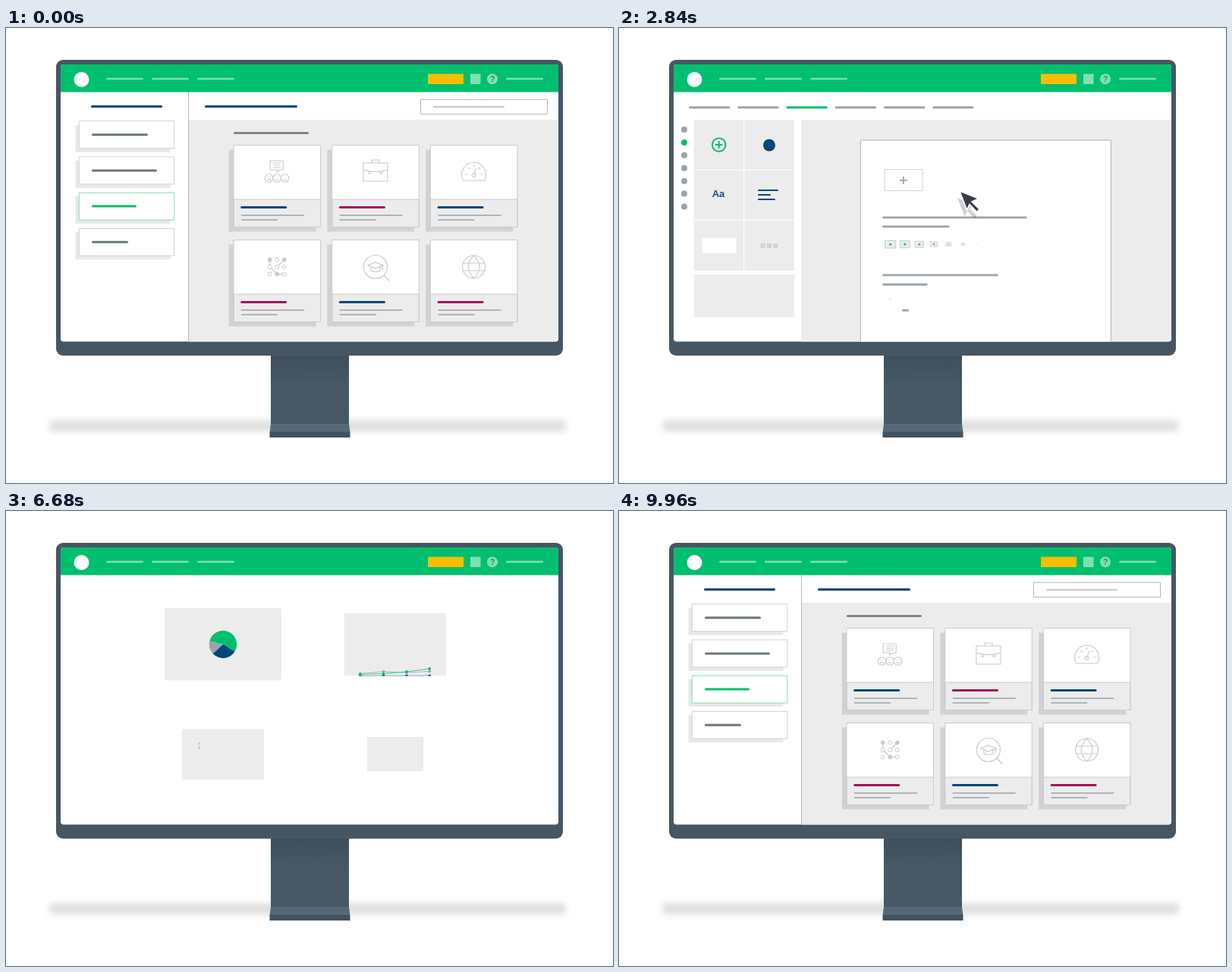
Animation of 800x600 px, one loop 10000 ms. Source, as an HTML page with a canvas:

```html
<!DOCTYPE html>
<html lang="en">
<head>
<meta charset="utf-8">
<title>Survey builder on a monitor</title>
<style>
  html, body { margin: 0; width: 100%; height: 100%; overflow: hidden; background: #fff; }
  canvas { display: block; }
</style>
</head>
<body>
<canvas id="stage" width="800" height="600"></canvas>
<script>
const ctx = document.getElementById('stage').getContext('2d');
const GREEN = '#00bf6f', NAVY = '#00467f', PLUM = '#a3135a', GREY = '#9ba4aa',
      SLATE = '#6b777d', PALE = '#ececec', MINT = '#80dfb3', ICON = '#c8cacc';
const TAU = Math.PI * 2;

// Timing
const part = (t, start, dur) => Math.min(1, Math.max(0, (t - start) / dur));
const easeOut = (t, start, dur = 1000) => {
  const p = part(t, start, dur);
  return p === 1 ? 1 : 1 - 2 ** (-10 * p);
};
const easeIn = (t, start, dur) => part(t, start, dur) ** 3;
const easeBoth = p => p < .5 ? 4 * p ** 3 : 1 - 4 * (1 - p) ** 3;

// Drawing
function group(x, y, scale, draw) {
  if (scale < .005) return;
  ctx.save();
  ctx.translate(x, y);
  ctx.scale(scale, scale);
  draw();
  ctx.restore();
}
function paint(fill, stroke, width = 1) {
  if (fill) { ctx.fillStyle = fill; ctx.fill(); }
  if (stroke) { ctx.strokeStyle = stroke; ctx.lineWidth = width; ctx.stroke(); }
}
function box(x, y, w, h, fill, stroke, radius = 0) {
  ctx.beginPath();
  ctx.roundRect(x, y, w, h, radius);
  paint(fill, stroke);
}
function dot(x, y, r, fill, stroke, width) {
  ctx.beginPath();
  ctx.arc(x, y, r, 0, TAU);
  paint(fill, stroke, width);
}
function bar(x1, x2, y, color, w = 3, grow = 1) {
  if (grow > 0) box(x1, y - w / 2, (x2 - x1) * grow, w, color, null, w / 2);
}
function path(d, fill, stroke, width = 1.1) {
  const p = new Path2D(d);
  if (fill) { ctx.fillStyle = fill; ctx.fill(p); }
  if (stroke) { ctx.strokeStyle = stroke; ctx.lineWidth = width; ctx.stroke(p); }
}
function clip(x, y, w, h, radius = 0) {
  ctx.beginPath();
  ctx.roundRect(x, y, w, h, radius);
  ctx.clip();
}
function text(s, x, y, font, color) {
  ctx.font = font + ' "Liberation Sans", sans-serif';
  ctx.textAlign = 'center';
  ctx.textBaseline = 'middle';
  ctx.fillStyle = color;
  ctx.fillText(s, x, y);
}

function drawMonitor() {
  ctx.fillStyle = '#fff';
  ctx.fillRect(0, 0, 800, 600);
  ctx.filter = 'blur(4px)';
  box(57, 517, 681, 15, '#dedede', null, 5);
  ctx.filter = 'none';
  const shade = ctx.createLinearGradient(0, 432, 0, 470);
  shade.addColorStop(0, '#3f4f5b');
  shade.addColorStop(1, '#475965');
  box(349, 430, 103, 95, shade);
  path('M349 522H452L453.5 533H347.5Z', '#546978');
  box(347.5, 532.5, 106, 7.5, '#405260');
  box(66, 42, 668, 390, '#465763', null, 9);
}

function drawHeader() {
  box(72, 48, 656, 36.5, GREEN);
  dot(99.5, 68, 10, '#fff');
  for (const x of [132, 192, 252, 659]) bar(x, x + 49, 67, MINT, 2.6);
  box(556, 60.5, 47, 13.5, '#f9be00');
  box(612, 60.5, 13.5, 13.5, MINT);
  dot(641, 67.2, 7, MINT);
  text('?', 641, 68, 'bold 11px', '#258f61');
}

const icons = [
  () => {
    path('M-9 -15H8V-3H3L0 0V-3H-9ZM-5 -12H5M-5 -9H5M-5 -6H5', null, ICON);
    for (const x of [-10.5, 0, 10.5]) {
      dot(x, 8, 5.3, null, ICON, 1.1);
      dot(x - 1.8, 6.5, .6, ICON);
      dot(x + 1.8, 6.5, .6, ICON);
    }
    path('M-13 11Q-10.5 7.5 -8 11M-2.5 10H2.5M8 9Q10.5 12.5 13 9', null, ICON);
  },
  () => path('M-16 -12H16V12H-16ZM-5 -12V-16H5V-12M-16 -3Q0 2 16 -3M-9 -1V2H-6V0M6 0V2H9V-1', null, ICON),
  () => {
    path('M-14 11A16 16 0 1 1 14 11ZM0 4L3 -5M-12 3H-9M9 3H12M-8 -6L-6 -4M6 -4L8 -6M0 -10V-7', null, ICON);
    dot(0, 4, 2.5, null, ICON, 1.1);
  },
  () => {
    path('M-9.5 -9L-9.5 0M-9.5 0L0 9.5L9.5 9.5M0 0L9.5 -9.5', null, ICON);
    for (let i = 0; i < 9; i++)
      dot((i % 3 - 1) * 9.5, (Math.floor(i / 3) - 1) * 9.5, 2.5, [0, 2, 7].includes(i) ? ICON : '#fff', ICON);
  },
  () => {
    dot(0, 0, 15.5, null, ICON, 1.2);
    path('M11 11L18.5 18.5M-10 -2L0 -6L10 -2L0 2ZM-6 0V5Q0 8 6 5V0M9 -2V4', null, ICON, 1.2);
  },
  () => {
    dot(0, 0, 15, null, ICON, 1.2);
    path('M0 -15Q-15 0 0 15Q15 0 0 -15M-14 -5H14M-14 5H14', null, ICON);
  }
];

function drawCard(i, scale) {
  const x = 357.2 + (i % 3) * 129.7, y = i < 3 ? 208.5 : 333.5;
  group(x, y, scale, () => {
    box(-63.5, -48, 115, 108, '#d0d2d6');
    box(-57.2, -54, 114.5, 108, '#fff');
    box(-57.2, 17.5, 114.5, 36.5, PALE, '#c9cbcd');
    box(-57.2, -54, 114.5, 108, null, '#c9cbcd');
    bar(-48, 13, 28, i % 2 ? PLUM : NAVY);
    bar(-47.5, 36, 38.5, GREY, 1.6);
    bar(-47.5, 1, 44.5, GREY, 1.6);
    group(0, -18.5, 1, icons[i]);
  });
}

function drawDashboard(t) {
  const leaving = t < 5000;
  const show = (out, back) => leaving ? 1 - easeIn(t, out, 400) : easeOut(t, back, 700);
  const rows = [[74, SLATE], [86, SLATE], [59, GREEN], [48, SLATE]];
  rows.forEach(([w, color], i) => {
    const y = 140.7 + i * 47.2;
    const slide = leaving ? 0 : -160 * (1 - easeOut(t, 8677 + 40 * i));
    const size = leaving ? 1 - easeIn(t, 1200 + 40 * i, 400) : +(t > 8600);
    group(159 + slide, y, size, () => {
      box(-67.5, -13, 125, 36, '#e8e8e8');
      box(-62.7, -18, 125.5, 36, '#fff', color === GREEN ? MINT : '#cfd1d3');
      bar(-46, w - 46, 0, color);
    });
  });
  const head = show(1200, 9150);
  bar(112, 206, 103.5, NAVY, 3, head);
  bar(262, 384, 103.5, NAVY, 3, head);
  bar(300, 399, 138.5, SLATE, 2.6, head);
  if (head > 0) box(240, 84, 1, 330 * head, '#b4b6b8');
  group(630, 104, head, () => {
    box(-83.5, -9.7, 167, 19.2, '#fff', '#b4b6b8');
    bar(-67, 27, 0, '#cbcdcf', 2.6);
  });
  const outAt = [1339, 1300, 1339, 1441, 1369, 1441];
  outAt.forEach((start, i) =>
    drawCard(i, leaving ? 1 - easeIn(t, start, 600) : easeOut(t, 9230 + (i % 3 + (i > 2)) * 40, 600)));
}

function drawTools(t) {
  if (t < 1600 || t > 6600) return;
  ctx.save();
  ctx.translate(-480 * easeIn(t, 5950, 500), 0);
  for (let i = 0; i < 6; i++) {
    const x = 92 + i * 64.25;
    bar(x, x + 54.5, 104.7, i === 2 ? GREEN : GREY, 3, easeOut(t, 1862 + 23 * i));
  }
  for (let i = 0; i < 7; i++) {
    const a = easeOut(t, 1846 + 20 * i);
    ctx.globalAlpha = a;
    dot(86, 134 + 16.9 * i + 36 * (1 - a), 4, i === 1 ? GREEN : GREY);
  }
  ctx.globalAlpha = 1;
  box(98.5, 121, 132.5, 199 * easeOut(t, 1620), PALE);
  const wide = easeOut(t, 1918);
  box(231 - 132.5 * wide, 325, 132.5 * wide, 56.5, PALE);
  [[187, 1777], [253.5, 1920]].forEach(([y, start]) => {
    const half = 66 * easeOut(t, start);
    box(164.7 - half, y - .6, half * 2, 1.2, '#fff');
  });
  box(164, 121, 1.2, 199 * easeOut(t, 1756), '#fff');

  const rise = 36 * (1 - easeOut(t, 1650));
  ctx.globalAlpha = easeOut(t, 1650);
  dot(131.7, 154 + rise, 8.8, null, GREEN, 2);
  path(`M127 ${154 + rise}H136.4M131.7 ${149.3 + rise}V${158.7 + rise}`, null, GREEN, 2);
  dot(198, 154.5 + rise, 8, NAVY);
  text('Aa', 131, 219.5 + rise, 'bold 13px', '#254a7c');
  ctx.globalAlpha = 1;
  [27, 17, 23].forEach((w, i) => bar(183, 183 + w, 214 + 6 * i, NAVY, 2.2, easeOut(t, 1550 + i * 130)));
  group(132, 287, easeOut(t, 2000), () => box(-22.3, -10, 44.6, 20, '#fff'));
  for (let i = 0; i < 3; i++)
    group(189.5 + 8.4 * i, 287, easeOut(t, 2040 + 40 * i), () => box(-3, -3, 6, 6, '#d0d2d4'));
  ctx.restore();
}

function drawPaper(t) {
  const shift = t < 7500 ? 500 * easeIn(t, 5950, 500) : 500 * (1 - easeOut(t, 9000, 800));
  if (shift >= 490) return;
  ctx.save();
  clip(240, 121, 488, 293);
  ctx.translate(shift, 0);
  box(240, 121, 488, 293, PALE);
  if (t > 2100 && t < 6600) {
    const scroll = 300 * easeBoth(part(t, 4400, 800));
    group(0, 290 * (1 - easeOut(t, 2120)) - scroll, 1, () => {
      box(318.3, 146, 330, 528, '#fff', '#aeb1b3');
      group(375, 198.5, easeOut(t, 2450), () => {
        box(-26.7, -15, 53.5, 30, '#fff', '#d0d2d4');
        path('M-5.5 .5H5.5M0 -5V6', null, GREY, 2);
      });
      const lines = [[347, 567, 248], [347, 458, 260], [347, 567, 324], [347, 458, 336.3],
                     [373, 403, 370.5], [373, 417, 385], [481, 538, 355.7], [481, 511, 370.5]];
      lines.forEach(([a, b, y], i) => bar(a, b, y, GREY, 2.8, easeOut(t, 2550 + 60 * i)));
      for (let i = 0; i < 10; i++)
        group(357.7 + 19.1 * i, 283.3, easeOut(t, 2650 + 30 * i), () => {
          box(-9.55, -6.8, 19.1, 13.6, PALE, '#b4b7b9');
          dot(0, 0, 2.2, GREEN);
        });
      for (let i = 0; i < 5; i++)
        group(i < 3 ? 357 : 465, 355.8 + (i % 3) * 14.6, easeOut(t, 2800 + 40 * i),
          () => dot(0, 0, 4.1, '#fff', GREEN, 1));
    });
    const press = 1 - .06 * Math.sin(Math.PI * part(t, 5760, 200));
    group(484, 244, easeOut(t, 5180, 700) * press, () => {
      box(-74, -23, 128, 67.5, '#e6e6e6', null, 4);
      box(-64, -34, 128, 68, GREEN, '#00a862', 4);
      ctx.lineJoin = 'round';
      path('M22 -20L-26 -8L-16 3ZL-16 3L-15 15L-8 5M22 -20L-15 15M22 -20L-12 6L0 20Z', null, '#fff', 1.5);
    });
  }
  ctx.restore();
}

const slices = [[0, 198, GREEN], [198, 305, NAVY], [305, 360, GREY]];
function drawPie(radius, turn, sweep = 1, hole = 0) {
  for (const [from, to, color] of slices) {
    const [a, b] = [from, to].map(d => (d * sweep + turn - 90) * TAU / 360);
    ctx.beginPath();
    ctx.arc(0, 0, radius, a, b);
    if (hole) ctx.arc(0, 0, hole, b, a, true); else ctx.lineTo(0, 0);
    paint(color);
  }
}

const charts = [
  t => {
    const e = easeOut(t, 6500);
    group(0, 0, e, () => drawPie(35.5, -270 * (1 - e)));
  },
  t => {
    const xs = [-74, -25, 24, 72.5];
    const series = [[GREY, 6655, 34, 4.5, 18.5, 1.5], [NAVY, 6680, 21, 15.5, -13, -13], [GREEN, 6655, 43, 35, 7, -35]];
    for (const [color, start, ...values] of series) {
      const k = easeOut(t, start, 1100);
      const ys = values.map(y => 67 - (67 - y) * k);
      ctx.beginPath();
      xs.forEach((x, i) => ctx.lineTo(x, ys[i]));
      paint(null, color, 1.2);
      xs.forEach((x, i) => dot(x, ys[i], 3, color));
    }
  },
  t => [46, 80, 65, 103, 90, 125].forEach((w, i) =>
    box(-63, -31.7 + 11.4 * i, w * easeOut(t, [6674, 6677][i] || 6640 + 40 * i, 1200), 7, [GREY, NAVY, GREEN][i >> 1])),
  t => [0, -60, 120].forEach((turn, i) =>
    group(-53.2 * (1 - i), 0, 1, () => drawPie(20, turn, easeOut(t, 6740 + 80 * i, 1300), 14)))
];
const leaveAt = [8300, 8260, 8380, 8340];

function drawCharts(t) {
  if (t < 6500 || t > 9500) return;
  charts.forEach((draw, i) => {
    const slide = (Math.max(0, t - leaveAt[i]) / 108) ** 3;
    group((i % 2 ? 513 : 286) + slide, i < 2 ? 175.8 : 320.8, easeOut(t, 6500 + 40 * i), () => {
      clip(-108, -66.8, 216, 133.6, 4);
      box(-108, -66.8, 216, 133.6, PALE);
      draw(t);
    });
  });
}

const stops = [[300, 610, 440], [1000, 449, 215], [3200, 449, 215], [3950, 134, 286],
               [4300, 134, 286], [5100, 514, 241], [5950, 514, 241], [6350, 740, 440]];
const arrow = 'M0 0L25 10L16 14L26 24L22.5 27.5L13 17.5L9.5 25Z';
function drawCursor(t) {
  const i = stops.findIndex(s => s[0] > t);
  if (i < 1) return;
  const [t0, x0, y0] = stops[i - 1], [t1, x1, y1] = stops[i];
  const k = easeBoth((t - t0) / (t1 - t0));
  const press = [1120, 4080, 5760].reduce((s, c) => s - .12 * Math.sin(Math.PI * part(t, c, 200)), 1);
  group(x0 + (x1 - x0) * k, y0 + (y1 - y0) * k, press, () => {
    ctx.lineJoin = 'miter';
    group(-3, 9, 1, () => path(arrow, 'rgba(0,0,0,.18)'));
    path(arrow, '#333e48', '#fff', 1.6);
  });
}

function frame() {
  const t = performance.now() % 10000;
  drawMonitor();
  ctx.save();
  clip(72, 48, 656, 365.5, 4);
  box(72, 48, 656, 366, '#fff');
  drawPaper(t);
  drawTools(t);
  drawCharts(t);
  drawDashboard(t);
  drawHeader();
  drawCursor(t);
  ctx.restore();
  requestAnimationFrame(frame);
}
frame();
</script>
</body>
</html>
```
